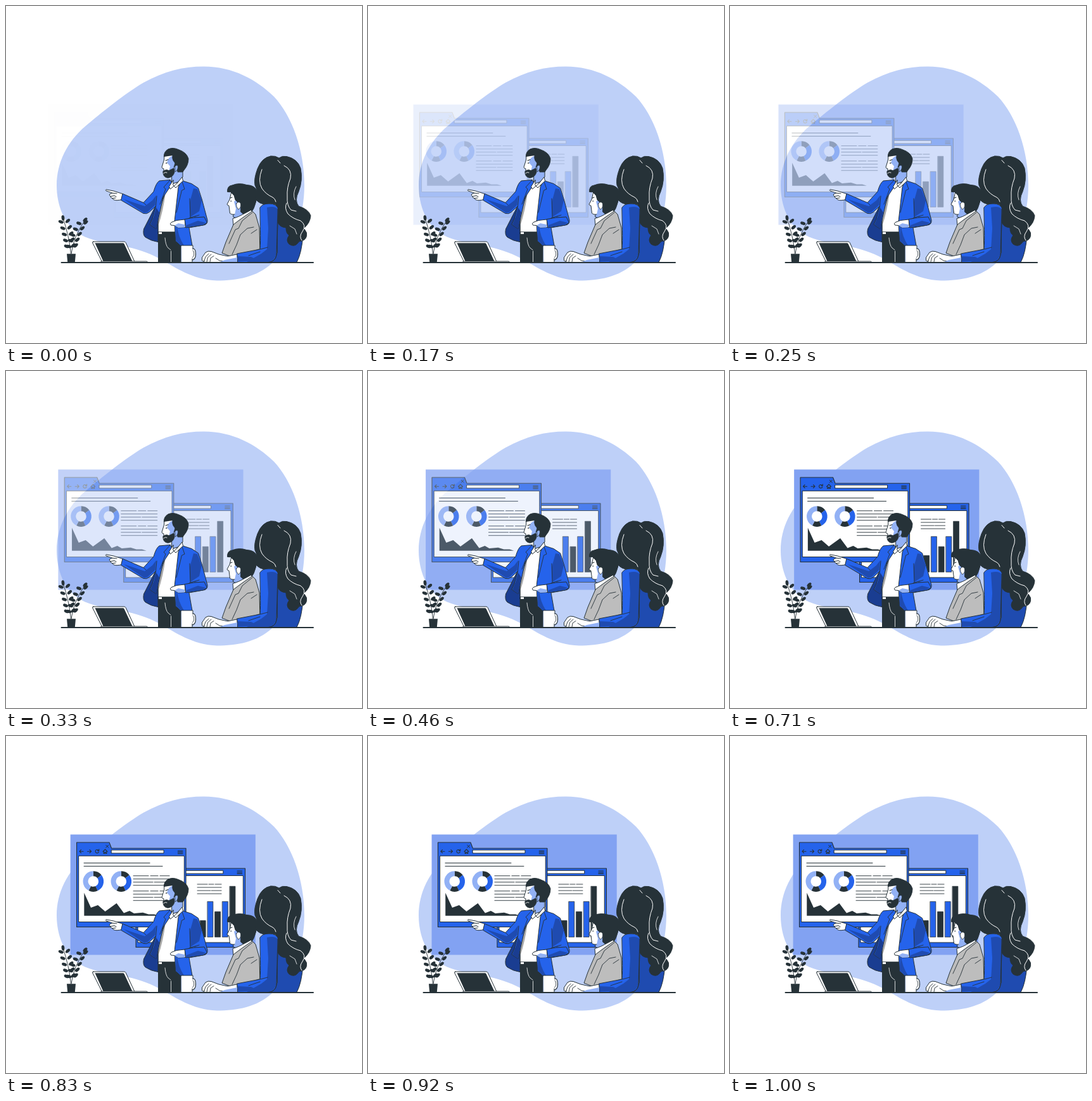
An HTML page with a canvas that plays this animation: 562 px wide and 532 px high, repeating every 1.04 s.

```html
<!DOCTYPE html>
<html lang="en">
<head>
<meta charset="utf-8">
<title>Team presentation</title>
<style>
html, body { margin: 0; width: 562px; height: 532px; overflow: hidden; background: #fff; }
canvas { display: block; }
</style>
</head>
<body>
<canvas id="stage" width="562" height="532"></canvas>
<script>
const W = 562, H = 532, LOOP = 1040, FPS = 24, SLIDE = 33.3;
const INK = '#263238', BLUE = '#2563eb', DEEP = '#1f4bb0', NAVY = '#1a3d91';
const PALE = '#92b1f5', BLOB = '#bed0f8', WALL = '#82a2f2', GREY = '#bdbdbd';

const view = document.getElementById('stage').getContext('2d');
const layer = () => {
  const c = document.createElement('canvas');
  c.width = W;
  c.height = H;
  return c.getContext('2d');
};
const screens = layer(), people = layer();
let g;

function shape(d, fill, stroke = INK, width = 1) {
  const p = new Path2D(d);
  if (fill) { g.fillStyle = fill; g.fill(p); }
  if (stroke) { g.strokeStyle = stroke; g.lineWidth = width; g.stroke(p); }
}
const fill = (d, color) => shape(d, color, null);
const line = (d, color = INK, width = 1) => shape(d, null, color, width);
const box = (x, y, w, h, color, stroke = INK, width = 1) =>
  shape(`M${x} ${y}h${w}v${h}h${-w}Z`, color, stroke, width);
const target = ctx => { g = ctx; g.lineCap = g.lineJoin = 'round'; };

function donut(x, y) {
  const cuts = [[-90, -38, INK], [-38, 65, BLUE], [65, 117, INK], [117, 270, PALE]];
  g.lineCap = 'butt';
  g.lineWidth = 8;
  for (const [a, b, color] of cuts) {
    g.beginPath();
    g.arc(x, y, 12.3, a * Math.PI / 180, b * Math.PI / 180);
    g.strokeStyle = color;
    g.stroke();
  }
  g.lineCap = 'round';
}

function textBlock(x, y, w) {
  const s = w / 57;
  for (let i = 0; i < 4; i++) {
    const ly = y + i * 5;
    const cuts = i % 2 ? [[0, 57]] : i ? [[0, 31], [33, 57]] : [[0, 24], [27, 39], [42, 57]];
    for (const [a, b] of cuts) line(`M${x + a * s} ${ly}H${x + b * s}`, INK, 0.9);
  }
}

const menu = (x, y) => {
  for (let i = 0; i < 3; i++) line(`M${x} ${y + i * 2.2}h7.5`, INK, 1.1);
};

function backWindow() {
  box(203, 209, 172.5, 124.5, BLUE, INK, 1.1);
  box(206.3, 220.5, 166, 105.5, '#fff');
  box(222, 212.3, 118.8, 4.9, '#fff');
  menu(363, 213);
  textBlock(300, 234, 38);
  [26, 56, 40, 56, 80].forEach((h, i) =>
    box(304.5 + i * 11.7, 317.3 - h, 8.6, h, i % 2 ? BLUE : INK, INK, 0.8));
}

function frontWindow() {
  shape('M109.5 301.5V168H161L164.5 177.2H282V301.5Z', BLUE, INK, 1.1);
  box(113, 189.3, 166.3, 104.2, '#fff');
  box(164.5, 180, 82.5, 5, '#fff');
  menu(269.3, 181.2);
  line('M155.7 172.2l4 4M159.7 172.2l-4 4');
  line('M120 182.2h-6m2.5-2.5-2.5 2.5 2.5 2.5M126.5 182.2h6m-2.5-2.5 2.5 2.5-2.5 2.5', INK, 1.1);
  line('M144.3 183A2.7 2.7 0 1 1 143.4 180M144.8 178.8v2.3h-2.4', INK, 1.1);
  line('M151 182.3 154.5 179 158 182.3M152.2 182v3.5h1.5v-2h1.6v2h1.5V182', INK, 1.1);
  line('M121 200.5H225M121 205.6H245');
  donut(135.8, 229.5);
  donut(179.8, 229.5);
  textBlock(199, 220.7, 57);
  textBlock(199, 244.7, 57);
  fill('M121.3 283.7V247.5L132 271 143 267 154.5 277 172.5 264 184 279.5 193 276 200 280 214 278.7 223 281.5 232 281.5 239 283.7Z', INK);
}

function drawScreens(dx) {
  target(screens);
  g.setTransform(1, 0, 0, 1, 0, 0);
  g.clearRect(0, 0, W, H);
  g.translate(dx, 0);
  fill('M99.6 155.5H391.8V345.5H99.6Z', WALL);
  backWindow();
  frontWindow();
}

function leaf(x, y, angle) {
  g.beginPath();
  g.ellipse(x, y, 4.2, 2.4, angle, 0, 7);
  g.fillStyle = INK;
  g.fill();
}

function branch(x0, y0, cx, cy, x1, y1) {
  line(`M${x0} ${y0}Q${cx} ${cy} ${x1} ${y1}`, INK, 0.9);
  const at = (a, b, c, t) => (1 - t) * (1 - t) * a + 2 * t * (1 - t) * b + t * t * c;
  for (let i = 0; i < 5; i++) {
    const t = 0.2 + i * 0.17, x = at(x0, cx, x1, t), y = at(y0, cy, y1, t);
    leaf(x - 5.5, y - 1, 0.35);
    leaf(x + 5.2, y - 2.5, -0.7);
  }
  leaf(x1, y1, x1 < x0 ? -1.7 : -0.8);
}

function plant() {
  branch(102.5, 391, 100, 365, 90, 334.5);
  branch(103, 391, 106, 365, 125, 337.5);
  fill('M96 391.3H110L108.8 404.5H97.2Z', INK);
}

function laptop() {
  shape('M138 372H186.5Q188.3 372 189 373.5L203 403.5H151.5L136.7 374Q136 372 138 372Z', '#fff');
  fill('M140.5 374.3H184.5Q186 374.3 186.7 375.7L199.5 403H153.5Z', INK);
  shape('M150 403H221.5Q223.5 403 223.5 404.8H152Z', '#fff', INK, 0.9);
}

function presenter() {
  // trousers and shirt
  fill('M240 358H267L276.5 375V405H240Z', INK);
  line('M251 366Q252 378 256 382L260 385M260.5 387V404', '#fff', 0.8);
  shape('M258 280 248 302 240 328V357H267.5L273 281 264 276Z', '#fff');
  fill('M252 294Q241 315 240.3 347Q248 325 252 294Z', '#a9a9a9');
  box(240, 356.8, 27, 2.6, INK, INK, 0.6);
  fill('M241 357H246V360H241Z', '#fff');
  // neck and head
  shape('M262 262 279 257V270L271 278 262 281Z', PALE);
  fill('M250 233 249.5 243 246 254.5Q246.5 256.5 249 257L249 265 262 268 271 258 276 240 262 232Z', '#fff');
  line('M250 236 249.5 243 246 254.5Q246.5 256.5 249 257V261');
  fill('M263 236 257 240 254 247 259 253 257 261 266 264 272 257 268 243Z', PALE);
  shape('M249.3 238Q249 230 256 226Q264 222.5 273 227Q285 231 288 241Q288 251 281 259L279 262 271 262 270 253Q267 250 265 255L267 248 264 244Q262 240 263 236 256 236Z', INK);
  shape('M248 261Q253 257 257 260L265 256 266 262Q264 270 256 271.3Q250 271 248.5 266Z', INK);
  line('M249 264Q251 261.5 254 263', '#fff', 0.9);
  shape('M267 253Q271 249 271.5 254Q271 260 267.5 261.5Z', PALE, INK, 0.8);
  line('M252 244 256 242.5M252.5 248.2 254 247.8', INK, 1.2);
  // pointing arm and left side of the jacket
  shape('M184 296.5 170 292 158 289.7Q156.5 290.5 158 291.8L168 295.3 163.5 297Q162.5 299 165 300.5Q165 303 168 303.6Q169 306.5 175 306.8L182 306Z', '#fff');
  line('M168 295.3 175 296M165 300.5 171 299.5 174 301M168 303.6 173 303');
  shape('M236 316 217.5 352Q215.5 361 220 365Q229 371 240 372.5L240 328 250 299Z', NAVY);
  shape('M259 274.5 242 276Q237 279 233 293L217 310.5 184 296.3 181.5 306.5 217 327.5Q222 329 226 325.5L236.5 316 231 336 227 345 237 352 248 302 262 281Z', BLUE);
  fill('M186 305 219 316 231 307 237 299 235.5 314 223 325.5 218 326.5Z', DEEP);
  fill('M237 318 233 333 228 345 237 352 242 326Z', NAVY);
  line('M236.5 316 238 300M217 310.5 221 314M259 275 249 286 252 289 243 313', INK, 0.9);
  // right side with the bent arm
  shape('M277.5 275.5 293 280.5 303.5 287.5 309.5 306 318 338Q318.5 343.5 314 345.5L289 350 294 378.5H276L267.5 371 266 340 272 286Z', BLUE);
  fill('M296 288 290 310 291 333 305 324 309 307 302 289ZM290 343 298 332 313 337 317 342 314 345 290 349Z', DEEP);
  fill('M269 343 267.8 370 276 378H281Q272 365 269 343Z', DEEP);
  line('M290 304 291 334 283 338.5M291 334 305 330M277.5 276 282 289 277.5 291 269 326', INK, 0.9);
  shape('M282 337 269 338.5 261 341.5Q258 344 260.5 346L266 346.5 272 350 283 349.5Z', '#fff');
  fill('M266 346.5 272 343 282 345V349.5L272 350Z', PALE);
  shape('M282 337 284 350 311 346 317.5 342 313 333 297 334Z', BLUE);
  fill('M285 346 303 339 315 342 310 345.5 285 349.3Z', DEEP);
  shape('M264 275 257.5 285 259.5 289 270 280 278 270 279.5 276 268 287 264 283Z', '#fff');
}

function mug() {
  shape('M289.5 383H296Q299.5 384 299.5 392Q299.5 401 292 401.5H290Z', '#fff', INK, 1.2);
  shape('M291 386H295Q297 387 296.8 392Q296 398 291 398.5Z', '#fff', INK, 0.8);
  fill('M277 378H295L293.5 404.5H277.5Z', '#fff');
  line('M277 378H295V384M294 399V404');
}

function listener() {
  shape('M360 312 384 318 388 326 368 337 359 333Z', PALE);
  fill('M355 290 353.3 305 349 313Q349.5 315 352 315.3L353.5 327Q355 329.5 361 329L369 321 373 300Z', '#fff');
  line('M355.5 295 353.3 305 349 313Q349.5 315 352 315.3L353.5 327Q355 329.5 361 329');
  fill('M365 303 360 309 363 320 361 329 370 330 375 318Z', PALE);
  shape('M349.5 293Q349 284 357 283Q368 278.5 380 282.5Q394 283 396 293Q397.5 304 393 314Q390 325 383 328H374L370.5 325 371 312 367 311 362 306 360 299 355 294Z', INK);
  shape('M363.5 312Q368 307 370.5 312Q371 320 366.5 321Q363 317 363.5 312Z', '#fff', INK, 0.8);
  line('M354 303 357 302M354.5 308 356 308', INK, 1.1);
  shape('M358 336 359 347 370 337 389 326 387 322 368 332Z', '#fff');
  shape('M389 324 394 329 400 350 401 392 364 399 341 390 347 373 359 345 371 336Z', GREY);
  line('M389 326 373 339 367 351 362 353 352 375M391 349 381 351 370 361 364 377 357 392M396 353 387 359M388 388 399 384', INK, 0.9);
}

function woman() {
  shape('M428 314 461 319 469 360Q467 390 459 404.5H418L428 390Z', DEEP);
  shape('M401 318Q406 311 416 312Q426 312 430 320L427 393Q425 404 414 404.5H365L364.5 391 401 384Q402 372 401.5 354Z', BLUE);
  fill('M412 318Q425 315 429 321L426.5 392Q424 403 414 404H380L403 391 412 384 414 351Z', DEEP);
  fill('M366 395 387 396 399 402 366 403.5Z', DEEP);
  line('M401.5 384 413 381M401 388 383 394M429 320 427 393Q425 404 414 404.5', INK, 0.9);
  shape('M364.5 392 350 395 336 392 324 387.5Q319 386 315 389L309.5 397V402Q311 404 313 402L312.5 404.5H365Z', '#fff');
  line('M313 402 315 396 320 391M317 404 318.5 397 324 392M322 404 323 398 328 394.5M331 398 337 402 346 403', INK, 0.9);
  fill('M345 401 365 397V404H338Z', PALE);
  // hair
  shape('M418 237Q404 239 397 257Q391 273 393 283Q398 291 393 300Q394 310 407 313Q424 309 429 317Q431 326 429.5 342Q432 349 442 350Q442 359 447 362Q441 370 447 376Q455 381 460 375Q463 370 467 371Q476 368 474.5 358Q472 353 470 351Q480 343 481 331Q478 321 462 316Q455 307 462 293Q469 275 465 256Q460 241 443 237.5Q436 236 431 240Q425 236 418 237Z', INK);
  line('M404 258Q397 276 404 288Q410 297 421 302Q425 304 426 309', '#fff');
  line('M429 243.5 433 248M439 252Q452 258 449 272Q443 287 444 301Q443 315 450 322L458 324', '#fff');
  line('M443 311Q439 319 445 328Q453 336 465 339Q475 346 468 356Q462 364 467 370', '#fff');
  line('M458 285Q452 296 456 306M448 347 456 352 459 360', '#fff', 0.8);
}

target(people);
plant();
laptop();
presenter();
mug();
listener();
woman();
line('M87.5 405H485', INK, 2);

// cubic-bezier(.36, -.01, .5, 1.38)
function ease(x) {
  if (x >= 1) return 1;
  const curve = (a, b, s) => 3 * (1 - s) * (1 - s) * s * a + 3 * (1 - s) * s * s * b + s * s * s;
  let lo = 0, hi = 1;
  for (let i = 0; i < 30; i++) {
    const mid = (lo + hi) / 2;
    if (curve(0.36, 0.5, mid) < x) lo = mid; else hi = mid;
  }
  return curve(-0.01, 1.38, lo);
}

function draw(ms) {
  const step = Math.floor(ms % LOOP * FPS / 1000 + 0.1);
  const p = ease((step + 1) / FPS);
  drawScreens((p - 1) * SLIDE);

  target(view);
  g.fillStyle = '#fff';
  g.fillRect(0, 0, W, H);
  fill('M80 283C80 247 97 214 125 190C150 169 188 138 217 121C250 103 279 95.5 312 95.5C358 95.5 395 116 423 143C452 174 471 228 471 283C471 330 455 382 420 406C396 428 365 433.5 333 433.5C294 432 268 413 243 399C222 388 205 383 185 379C160 374 135 371 118 361C92 346 80 315 80 283Z', BLOB);
  g.globalAlpha = Math.max(0, Math.min(1, p));
  g.drawImage(screens.canvas, 0, 0);
  g.globalAlpha = 1;
  g.drawImage(people.canvas, 0, 0);
}

const start = performance.now();
function tick() {
  draw(performance.now() - start);
  requestAnimationFrame(tick);
}
tick();
</script>
</body>
</html>
```
